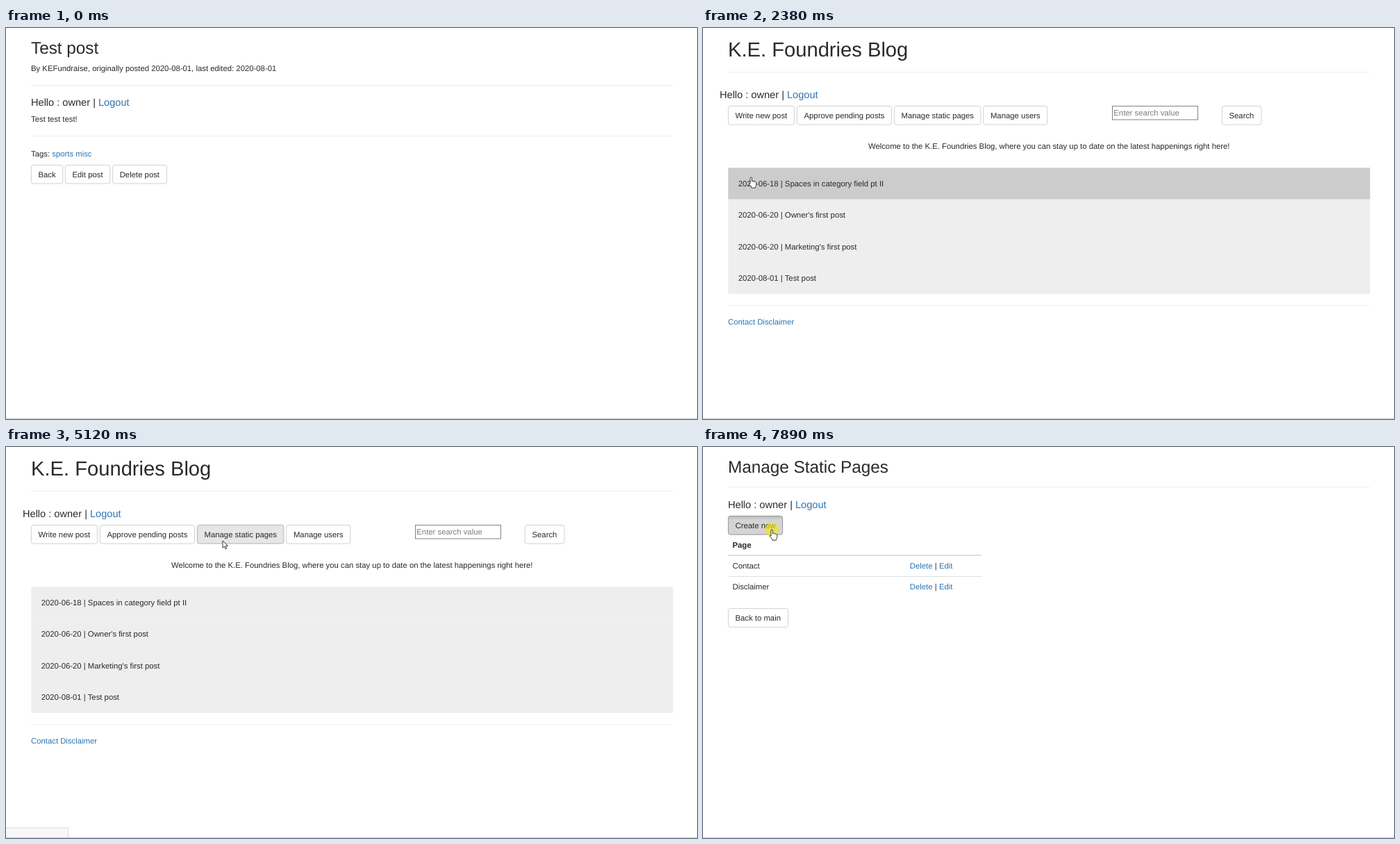
An HTML page for the animation above (8000 ms loop, 995 by 563 pixels).

```html
<!DOCTYPE html>
<html lang="en">
<head>
<meta charset="utf-8">
<title>Page walkthrough</title>
<style>
  html, body { margin: 0; width: 100%; height: 100%; overflow: hidden; background: #fff; }
  svg { display: block; font-family: "Liberation Sans", Arial, sans-serif; fill: #2a2a2a; text-rendering: geometricPrecision; }
  .link { fill: #2f74b3; }
  .link.on { fill: #23527c; text-decoration: underline; }
</style>
</head>
<body>
<svg id="stage" width="995" height="563" viewBox="0 0 995 563"></svg>
<script>
const LOOP = 8000, STEP = 77;
const BODY = 11.34, H4 = 14.58, H2 = 24.3, H1 = 29.16;
const PAGE_B = 1210, PAGE_C = 5180;

// Pointer hot spot: [time, x, y]
const PATH = [
  [280, 790, 485], [434, 560, 400], [588, 230, 270], [742, 90, 222], [910, 64, 217],
  [2380, 69, 215], [2457, 64, 250], [2534, 57, 300], [2611, 53, 346], [2688, 70, 325],
  [2765, 120, 260], [2842, 180, 200], [2919, 250, 160], [2996, 300, 130], [3150, 282, 134],
  [3320, 220, 138], [3400, 268, 136], [3470, 312, 135],
  [5810, 305, 139], [6190, 322, 160], [6344, 347, 201], [6498, 310, 220],
  [6652, 200, 172], [6806, 120, 128], [6960, 101, 120], [7130, 100, 119], [7890, 99, 119]
];
// Key times after which the pointer rests until the next one
const RESTS = [910, 3150, 3320, 3470, 5810, 6960, 7130, 7890];
const PRESSES = [[1060, 1140], [4020, 4720], [7430, LOOP]];
const LOADS = [[1140, PAGE_B], [4720, PAGE_C]];
const POSTS = [
  ["2020-06-18 | Spaces in category field pt II", 1210, 2457],
  ["2020-06-20 | Owner's first post", 2457, 2534],
  ["2020-06-20 | Marketing's first post", 2534, 2611],
  ["2020-08-01 | Test post", 2611, 2765]
];
const HAND = "M-1 9V1.2Q-1 0 .2 0T1.4 1.2V5.5Q2.7 4.8 3.6 5.9 5 5.3 5.9 6.5 7.4 6.2 7.7 7.6V10.5Q7.6 12.5 6.5 13.5V15.2H.8V14L-2.6 9.8Q-3.2 8.6 -2.2 8.2Z";
const ARROW = "M0 0V10.2L2.4 8 4 11.8 5.7 11.1 4.1 7.4 7.4 7.3Z";
const DEFS = `<linearGradient id="pressed" x2="0" y2="1">
  <stop stop-color="#b8b8b8"/><stop offset=".2" stop-color="#d4d4d4"/></linearGradient>`;

const stage = document.getElementById("stage");
let mx, my, pressed, overLink;

const clamp = v => Math.max(0, Math.min(1, v));
const during = (spans, t) => spans.some(([a, b]) => t >= a && t < b);

function pointer(t) {
  const i = PATH.findLastIndex(k => t >= k[0]);
  if (i < 0) return [-99, -99];
  const [t0, x0, y0] = PATH[i], next = PATH[i + 1];
  if (!next || RESTS.includes(t0)) return [x0, y0];
  const u = Math.floor((t - t0) / STEP) * STEP / (next[0] - t0);
  return [x0 + (next[1] - x0) * u, y0 + (next[2] - y0) * u];
}

function hit(x, y, w, h) {
  const on = mx >= x && mx <= x + w && my >= y && my <= y + h;
  overLink ||= on;
  return on;
}

// Text placed by the middle of its line
const text = (x, mid, str, size = BODY, attrs = "") =>
  `<text x="${x}" y="${mid + size * 0.3465}" font-size="${size}" ${attrs}>${str}</text>`;

const box = (x, y, w, h, fill, attrs = "") =>
  `<rect x="${x}" y="${y}" width="${w}" height="${h}" fill="${fill}" ${attrs}/>`;

const rule = y => box(36, y, 924, 0.9, "#eaeaea");
const span = str => `<tspan class="link">${str}</tspan>`;
const hello = (x, mid) => text(x, mid, `Hello : owner | ${span("Logout")}`, H4);

function link(x, mid, w, str) {
  const on = hit(x, mid - 7, w, 14);
  return text(x, mid, str, BODY, `class="link${on ? " on" : ""}"`);
}

function button(x, y, w, label) {
  const on = hit(x, y, w, 27.5);
  const [fill, edge] = !on ? ["#fff", "#ccc"] : pressed ? ["url(#pressed)", "#8c8c8c"] : ["#e6e6e6", "#adadad"];
  return box(x + 0.4, y + 0.4, w - 0.8, 26.7, fill, `rx="3" stroke="${edge}" stroke-width=".9"`) +
    text(x + 10.5, y + 13.75, label);
}

const postPage = () =>
  text(36, 28.1, "Test post", H2) +
  text(36, 57.6, "By KEFundraise, originally posted 2020-08-01, last edited: 2020-08-01") +
  rule(82) + hello(36, 107) +
  text(36, 131.3, "Test test test!") + rule(155.4) +
  text(36, 180.7, `Tags: ${span("sports misc")}`) +
  button(36, 196.9, 46.2, "Back") + button(85, 196.9, 65.2, "Edit post") + button(153.2, 196.9, 78.5, "Delete post");

function postRow([title, start, end], i, t) {
  const y = 201.3 + i * 45.35;
  const level = clamp(clamp((Math.min(t, end) - start) / 400) - clamp((t - end) / 400));
  const grey = Math.round(238 - 34 * level);
  hit(36, y, 924.4, 45.35);
  return box(36.2, y, 924.3, 45.4, `rgb(${grey},${grey},${grey})`) + text(50.7, y + 22.7, title);
}

const blogPage = t =>
  text(36, 31, "K.E. Foundries Blog", H1) + rule(63.4) + hello(24, 96.1) +
  button(36, 112, 95.8, "Write new post") + button(135, 112, 136.8, "Approve pending posts") +
  button(275, 112, 125.3, "Manage static pages") + button(403.4, 112, 92.8, "Manage users") +
  box(589.5, 112.5, 123, 19.5, "#fff", 'stroke="#767676" stroke-width=".9"') +
  text(591.3, 122.5, "Enter search value", BODY, 'fill="#7d7d7d"') +
  button(747, 112, 57.4, "Search") +
  text(498.2, 170, "Welcome to the K.E. Foundries Blog, where you can stay up to date on the latest happenings right here!",
    BODY, 'text-anchor="middle"') +
  POSTS.map((post, i) => postRow(post, i, t)).join("") +
  rule(399.2) + text(36, 423.5, span("Contact Disclaimer"));

const tableRow = (mid, name) =>
  text(42.5, mid, name) + link(297.8, mid, 33, "Delete") + text(333.8, mid, "|") + link(340, mid, 20, "Edit");

const staticPage = () =>
  text(36, 28.1, "Manage Static Pages", H2) + rule(57.5) + hello(36, 82.6) +
  button(36, 99, 79, "Create new") +
  text(42.5, 141, "Page", BODY, 'font-weight="bold"') +
  box(36, 155.2, 365, 1.5, "#d6d6d6") + tableRow(171, "Contact") +
  box(36, 186, 365, 0.9, "#dcdcdc") + tableRow(201, "Disclaimer") +
  button(36, 232.2, 87, "Back to main");

function draw(now) {
  const t = now % LOOP;
  [mx, my] = pointer(t);
  pressed = during(PRESSES, t);
  overLink = false;
  let out = DEFS + (t < PAGE_B ? postPage() : t < PAGE_C ? blogPage(t) : staticPage());
  if (during(LOADS, t)) out += box(-1, 548.5, 90.5, 16, "#f8f8f8", 'stroke="#dcdcdc"');
  out += box(0, 562, 995, 1, "#c8c8c8");
  if (pressed) out += `<circle cx="${mx}" cy="${my}" r="10" fill="#f2e41c" opacity=".68"/>`;
  const waiting = t >= 5120 && t < PAGE_C;
  out += `<path d="${overLink && !waiting ? HAND : ARROW}" transform="translate(${mx} ${my})"
    fill="#fff" stroke="#222" stroke-width=".9" stroke-linejoin="round"/>`;
  stage.innerHTML = out;
}

const begin = performance.now();
function tick() {
  draw(performance.now() - begin);
  requestAnimationFrame(tick);
}
tick();
</script>
</body>
</html>
```
